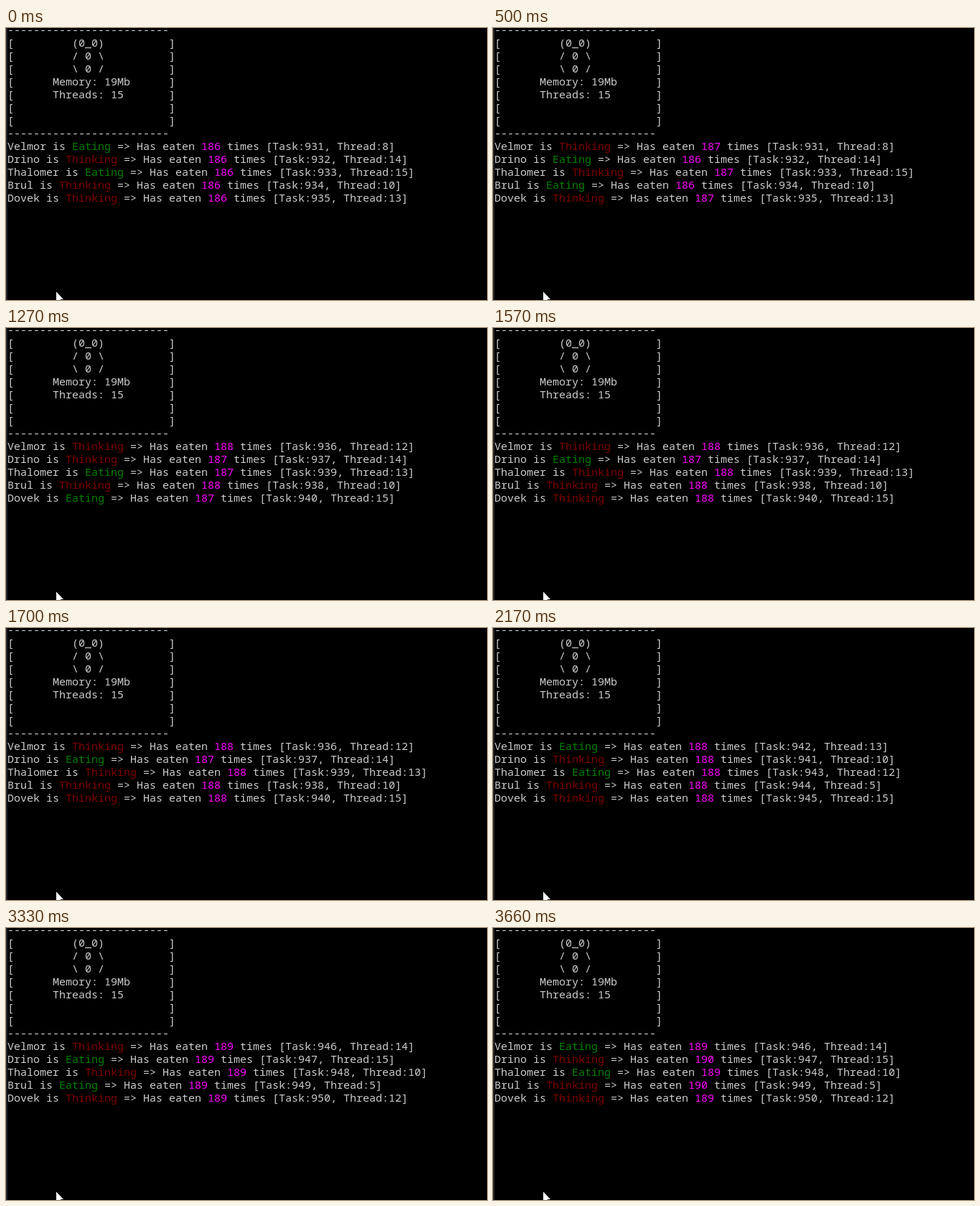
Recreate the animation shown at these times as an HTML page. Size 670 by 379 pixels, loop 3.91 s.

```html
<!DOCTYPE html>
<html lang="en">
<head>
<meta charset="utf-8">
<title>Dining philosophers</title>
<style>
html, body { margin: 0; width: 100%; height: 100%; overflow: hidden; background: #000; }
svg { display: block; }
text { font: 500 15px "Noto Sans Mono", "DejaVu Sans Mono", monospace; fill: #ccc; white-space: pre; }
.eat { fill: #008000; }
.think { fill: #800000; }
.count { fill: #f0f; }
</style>
</head>
<body>
<svg width="670" height="379" viewBox="0 0 670 379">
  <rect width="670" height="379"/>
  <rect x="0.5" width="1" height="379" fill="#505050"/>
  <g id="screen"></g>
  <path d="M70 367.5L80 378H76V379H70Z" fill="#fff"/>
</svg>
<script>
const LOOP = 3910;
const NAMES = ["Velmor", "Drino", "Thalomer", "Brul", "Dovek"];
const ROUNDS = [
  { tasks: [931, 932, 933, 934, 935], threads: [8, 14, 15, 10, 13] },
  { tasks: [936, 937, 939, 938, 940], threads: [12, 14, 13, 10, 15] },
  { tasks: [942, 941, 943, 944, 945], threads: [13, 10, 12, 5, 15] },
  { tasks: [946, 947, 948, 949, 950], threads: [14, 15, 10, 5, 12] }
];
// start time, activity per seat, meals beyond 186 per seat, round
const STEPS = [
  [0, "ETETT", "00000", 0],
  [70, "TTTTE", "10100", 0],
  [500, "TETET", "10101", 0],
  [840, "ETTET", "11111", 1],
  [1270, "TTETE", "21121", 1],
  [1570, "TETTT", "21222", 1],
  [2170, "ETETT", "22222", 2],
  [2450, "TTTTE", "32322", 2],
  [2890, "TETET", "32323", 2],
  [3330, "TETET", "33333", 3],
  [3660, "ETETT", "34343", 3]
];
// moments when the console is cleared before a redraw
const CLEARS = [[1660, 1700], [2520, 2560], [3390, 3420]];

const screen = document.getElementById("screen");
const rule = "-".repeat(25);
const boxed = (indent, s) => "[" + (" ".repeat(indent) + s).padEnd(24) + "]";
const header = [
  rule, boxed(9, "(0_0)"), boxed(9, "/ 0 \\"), boxed(9, "\\ 0 /"),
  boxed(6, "Memory: 19Mb"), boxed(6, "Threads: 15"), boxed(0, ""), boxed(0, ""), rule
];

function addRow(row) {
  const el = document.createElementNS("http://www.w3.org/2000/svg", "text");
  el.setAttribute("x", 2);
  el.setAttribute("y", 8 + 18 * row);
  screen.append(el);
  return el;
}

header.forEach((line, i) => { addRow(i).textContent = line; });
const seats = NAMES.map((_, i) => addRow(header.length + i));

const span = (cls, s) => `<tspan class="${cls}">${s}</tspan>`;

function draw([, acts, meals, round]) {
  const { tasks, threads } = ROUNDS[round];
  seats.forEach((el, i) => {
    const act = acts[i] === "E" ? span("eat", "Eating") : span("think", "Thinking");
    const count = span("count", 186 + Number(meals[i]));
    el.innerHTML = `${NAMES[i]} is ${act} =&gt; Has eaten ${count} times [Task:${tasks[i]}, Thread:${threads[i]}]`;
  });
}

let shown;
function tick() {
  const t = performance.now() % LOOP;
  const step = STEPS.findLast(s => s[0] <= t);
  if (step !== shown) draw(shown = step);
  const cleared = CLEARS.some(([a, b]) => t >= a && t < b);
  screen.style.visibility = cleared ? "hidden" : "visible";
  requestAnimationFrame(tick);
}
tick();
</script>
</body>
</html>
```
